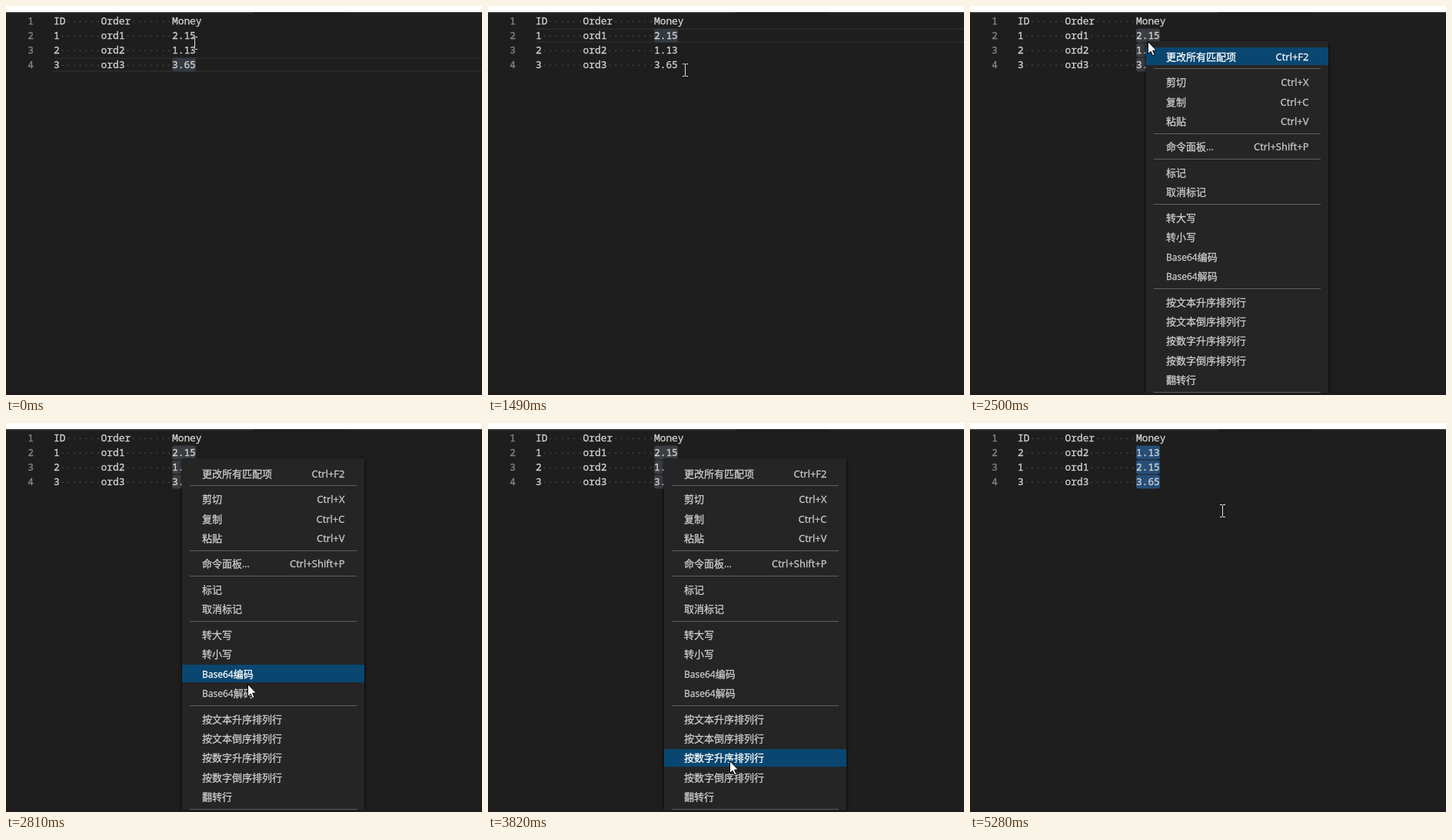
Recreate the animation shown at these times as an HTML page with a canvas. Size 619x507 px, loop 5.45 s.

```html
<!DOCTYPE html>
<html lang="zh">
<head>
<meta charset="utf-8">
<title>Sort lines</title>
<style>
  html, body { margin: 0; width: 100%; height: 100%; overflow: hidden; background: #1e1e1e; }
  canvas { display: block; }
</style>
</head>
<body>
<canvas id="stage" width="619" height="507"></canvas>
<script>
const ctx = document.getElementById('stage').getContext('2d');
const LOOP = 5450, CLICK = 860, SELECT = 1805, MENU = 2410, SORT = 4670;
const BLINK = 500, HOVER_LAG = 60;

const CODE_FONT = '12.83px "Noto Sans Mono", monospace';
const CJK_FONT = '13px "Noto Sans CJK SC", "Noto Sans CJK", sans-serif';
const LATIN_FONT = '12px "Open Sans", sans-serif';
const KEYS_FONT = '13px "Open Sans", sans-serif';

const COL = 7.7, LEFT = 62, ROW = 19, TOP = 10;
const STEP = 25.4, GAP = 8.1;

// Pointer gestures; it rests in between
const HOME = { x: 245, y: 48 };
const MOVES = [
  { from: 0, to: 610, x: 219, y: 45 },
  { from: 860, to: 1160, x: 263, y: 90 },
  { from: 1400, to: 1490, x: 256, y: 83 },
  { from: 1550, to: 2180, x: 231, y: 46 },
  { from: 2540, to: 2810, x: 314, y: 340 },
  { from: 2900, to: 3110, x: 316, y: 457 },
  { from: 3430, to: 3820, x: 314, y: 440 },
  { from: 4970, to: 5280, x: 328, y: 114 }
];

// Groups are parted by separators
const GROUPS = [
  [['更改所有匹配项', 'Ctrl+F2']],
  [['剪切', 'Ctrl+X'], ['复制', 'Ctrl+C'], ['粘贴', 'Ctrl+V']],
  [['命令面板...', 'Ctrl+Shift+P']],
  [['标记'], ['取消标记']],
  [['转大写'], ['转小写'], ['Base64编码'], ['Base64解码']],
  [['按文本升序排列行'], ['按文本倒序排列行'], ['按数字升序排列行'],
    ['按数字倒序排列行'], ['翻转行']]
];
const ITEMS = GROUPS.flatMap((group, g) => group.map(([label, keys], i) => ({
  label, keys, endsGroup: i === group.length - 1, gaps: g * GAP
}))).map((item, i) => ({ ...item, y: 66 + i * STEP + item.gaps }));

const between = (t, a, b) => t >= a && t < b;
const easeOut = k => 1 - (1 - k) ** 3;

function pointerAt(t) {
  let { x, y } = HOME;
  for (const m of MOVES) {
    const k = easeOut(Math.min(1, Math.max(0, (t - m.from) / (m.to - m.from))));
    x += (m.x - x) * k;
    y += (m.y - y) * k;
  }
  return { x: Math.round(x), y: Math.round(y) };
}

function hoveredItem(t) {
  const { y } = pointerAt(t - HOVER_LAG);
  return ITEMS.reduce((a, b) => Math.abs(b.y - y) < Math.abs(a.y - y) ? b : a);
}

function rect(x, y, w, h, color) {
  ctx.fillStyle = color;
  ctx.fillRect(x, y, w, h);
}

// A hairline outline gives the letters a little more weight
function text(str, x, y, font, color, align = 'left') {
  ctx.font = font;
  ctx.fillStyle = ctx.strokeStyle = color;
  ctx.lineWidth = 0.3;
  ctx.textAlign = align;
  ctx.fillText(str, x, y);
  ctx.strokeText(str, x, y);
}

const rowTop = n => TOP + ROW * (n - 1);

function mark(row, color) {
  ctx.fillStyle = color;
  ctx.beginPath();
  ctx.roundRect(216, rowTop(row) + 0.5, 31, 18, 3);
  ctx.fill();
}

function currentLine(row) {
  for (const dy of [0, ROW - 2]) rect(LEFT, rowTop(row) + dy, 557, 2, '#282828');
}

function codeRow(n, cells) {
  const y = rowTop(n) + 14;
  text(n, 36, y, CODE_FONT, '#858585', 'right');
  const line = cells[0].padEnd(8, '·') + cells[1].padEnd(12, '·') + cells[2];
  [...line].forEach((ch, col) => {
    const x = LEFT + col * COL;
    if (ch === '·') rect(x + 3, y - 4.5, 1.6, 1.6, '#484848');
    else text(ch, x, y, CODE_FONT, '#d4d4d4');
  });
}

function editor(t) {
  rect(0, 0, 619, 507, '#1e1e1e');
  rect(0, 0, 619, 8, '#fff');
  rect(0, 8, 322, 2, '#2d2d2d');
  rect(443, 8, 176, 2, '#252526');

  if (t < SELECT) {
    const row = t < CLICK ? 4 : 2;
    currentLine(row);
    mark(row, '#343a41');
  } else {
    const color = between(t, MENU, SORT) ? '#3a3d41' : '#264f78';
    [2, 3, 4].forEach(row => mark(row, color));
  }

  const rows = [['1', 'ord1', '2.15'], ['2', 'ord2', '1.13'], ['3', 'ord3', '3.65']];
  if (t >= SORT) rows.sort((a, b) => a[2] - b[2]);
  [['ID', 'Order', 'Money'], ...rows].forEach((cells, i) => codeRow(i + 1, cells));

  if (between(t, CLICK, CLICK + BLINK)) rect(216, 29, 2, ROW, '#aeafad');
  if (between(t, SELECT, MENU) || between(t, SORT, 4990)) {
    rect(246, 29, 2, 3 * ROW, '#aeafad');
  }
}

// Latin and Chinese runs use different fonts
function label(str, x, y, color) {
  for (const run of str.match(/[ -~]+|[^ -~]+/g)) {
    text(run, x, y, /[ -~]/.test(run) ? LATIN_FONT : CJK_FONT, color);
    x += ctx.measureText(run).width;
  }
}

function menu(t) {
  ctx.save();
  ctx.shadowColor = '#000';
  ctx.shadowBlur = 4;
  ctx.shadowOffsetY = 2;
  rect(229, 46, 237, 480, '#252526');
  ctx.restore();

  const hovered = hoveredItem(t);
  for (const item of ITEMS) {
    const on = item === hovered;
    const color = on ? '#fff' : '#ccc';
    const base = Math.round(item.y + 4.7);
    if (on) rect(229, Math.round(item.y - 11.9), 237, 23, '#094771');
    label(item.label, 255, base, color);
    if (item.keys) text(item.keys, 440.5, base, KEYS_FONT, color, 'right');
    if (item.endsGroup) rect(239, Math.round(item.y + 15.4), 217, 1, '#606061');
  }
}

function arrow({ x, y }) {
  ctx.beginPath();
  [[0, 0], [0, 16], [3.6, 12.6], [6.2, 18.3], [8.6, 17.2], [6.1, 11.6], [11, 11.6]]
    .forEach(([dx, dy]) => ctx.lineTo(x + 0.5 + dx, y + 0.5 + dy));
  ctx.closePath();
  ctx.fillStyle = '#fff';
  ctx.fill();
  ctx.strokeStyle = '#000';
  ctx.lineWidth = 1;
  ctx.stroke();
}

// Inverts whatever lies below it
function beam({ x, y }) {
  ctx.globalCompositeOperation = 'difference';
  rect(x, y - 7, 1, 15, '#fff');
  for (const dy of [-8, 8]) {
    rect(x - 3, y + dy, 3, 1, '#fff');
    rect(x + 1, y + dy, 3, 1, '#fff');
  }
  ctx.globalCompositeOperation = 'source-over';
}

function draw(t) {
  const open = between(t, MENU, SORT);
  editor(t);
  if (open) menu(t);
  rect(0, 504, 619, 3, '#1f1b1d');
  (open ? arrow : beam)(pointerAt(t));
}

const start = performance.now();
function tick() {
  draw((performance.now() - start) % LOOP);
  requestAnimationFrame(tick);
}
tick();
</script>
</body>
</html>
```
